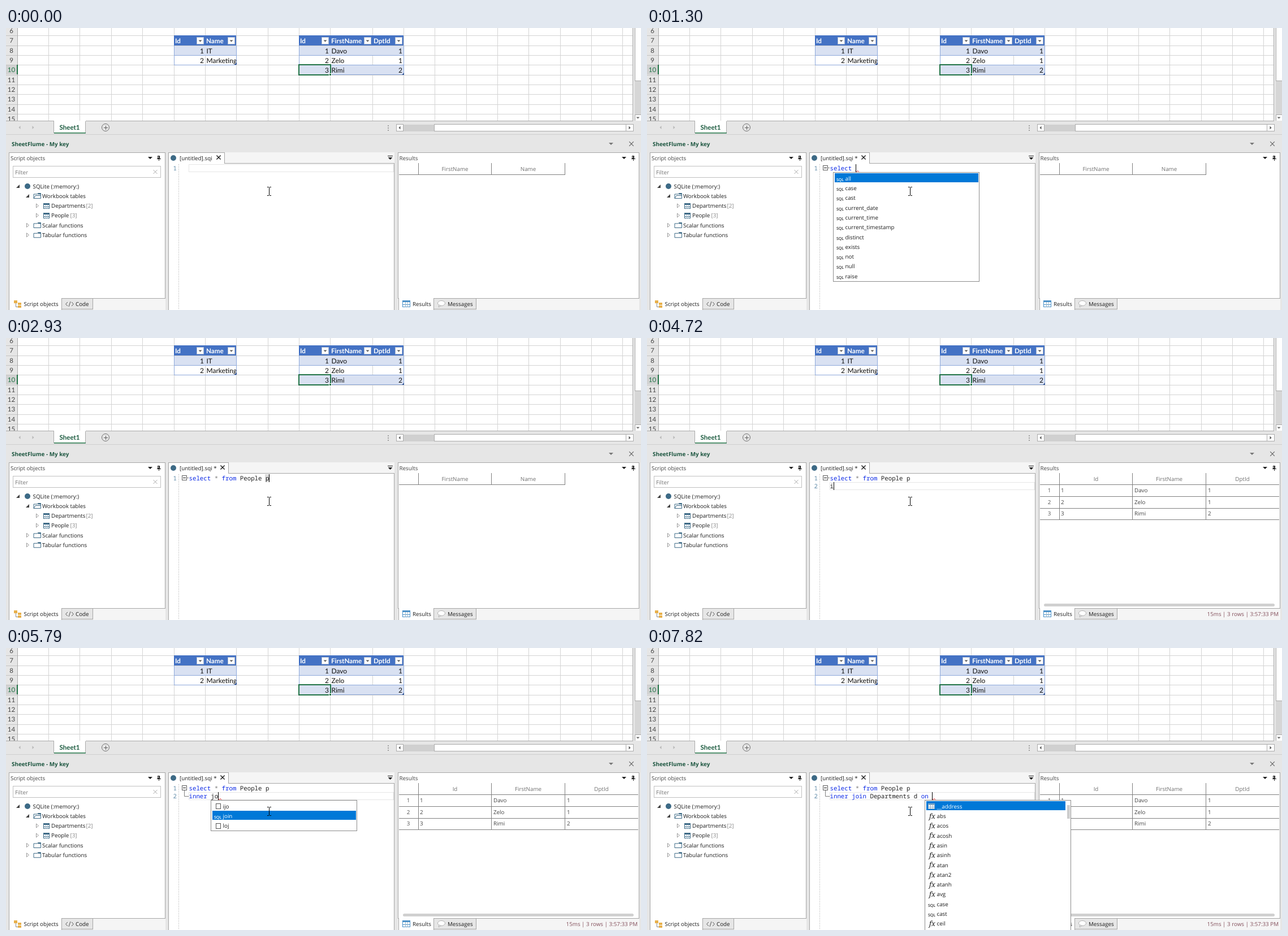
These frames come from a looping animation (1123x499 px, 7990 ms). An HTML page with a canvas:

```html
<!DOCTYPE html>
<html lang="en">
<head>
<meta charset="utf-8">
<title>SQL editor</title>
<style>
html, body { margin: 0; width: 100%; height: 100%; overflow: hidden; background: #e6e6e6; }
canvas { display: block; }
</style>
</head>
<body>
<canvas id="stage" width="1123" height="499"></canvas>
<script>
const g = document.getElementById('stage').getContext('2d');
g.textRendering = 'geometricPrecision';

const DURATION = 7990;
const UI = '"Open Sans", sans-serif', SHEET = 'Lato, sans-serif', CODE = '"Noto Sans Mono", monospace';
const GREEN = '#217346', DARK = '#1e1e1e', GRAY = '#e6e6e6', STRIP = '#f5f5f5', BORDER = '#a6a6a6';
const BLUE = '#0078d7', STEEL = '#3d6a86';
const CODE_X = 323.5, CHAR = 6.45, LINE_Y = [248, 262], ITEM = 17.33;

// Helpers
function box(x, y, w, h, fill, stroke) {
  if (fill) { g.fillStyle = fill; g.fillRect(x, y, w, h); }
  if (stroke) { g.strokeStyle = stroke; g.lineWidth = 1; g.strokeRect(x + .5, y + .5, w - 1, h - 1); }
}
const hline = (x1, x2, y, color) => box(x1, y, x2 - x1, 1, color);
const vline = (x, y1, y2, color) => box(x, y1, 1, y2 - y1, color);

// y is the middle of the capital letters; baselines snap to whole pixels
function text(str, x, y, { color = DARK, size = 9.8, font = UI, weight = 400, align = 'left', style = '' } = {}) {
  g.font = `${style} ${weight} ${size}px ${font}`;
  g.fillStyle = color;
  g.textAlign = align;
  g.fillText(str, x, Math.round(y + size * .36));
}
function path(points, { fill, stroke, width = 1, close = false }) {
  g.beginPath();
  points.forEach(([x, y]) => g.lineTo(x, y));
  if (close || fill) g.closePath();
  if (fill) { g.fillStyle = fill; g.fill(); }
  if (stroke) { g.strokeStyle = stroke; g.lineWidth = width; g.stroke(); }
}
function disc(x, y, r, fill, stroke) {
  g.beginPath();
  g.arc(x, y, r, 0, 7);
  if (fill) { g.fillStyle = fill; g.fill(); }
  if (stroke) { g.strokeStyle = stroke; g.lineWidth = 1; g.stroke(); }
}
const down = (x, y, r, fill) => path([[x - r, y - r / 2], [x + r, y - r / 2], [x, y + r / 2]], { fill });
const side = (x, y, r, fill) => path([[x - r / 2, y - Math.abs(r)], [x + r / 2, y], [x - r / 2, y + Math.abs(r)]], { fill });
function cross(x, y, r, stroke, width = 1.2) {
  path([[x - r, y - r], [x + r, y + r]], { stroke, width });
  path([[x - r, y + r], [x + r, y - r]], { stroke, width });
}
function pin(x, y) {
  box(x - 2, y - 4, 4, 5, null, DARK);
  vline(x, y - 4, y + 1, DARK);
  hline(x - 3, x + 4, y + 1, DARK);
  vline(x, y + 1, y + 5, DARK);
}
function tableIcon(x, y, w = 11, h = 10, color = STEEL) {
  const top = y - h / 2;
  box(x, top, w, h, '#fff', color);
  box(x, top, w, 3, color);
  hline(x, x + w, y + 1, color);
  for (let i = 1; i < 3; i++) vline(x + Math.round(i * w / 3), top + 3, top + h, '#9db8ca');
}
function folderIcon(x, y, open) {
  path([[x, y - 3], [x + 6.5, y - 3], [x + 7.5, y - 4.5], [x + 12.5, y - 4.5], [x + 12.5, y + 4.5], [x, y + 4.5]],
    { fill: '#fff', stroke: STEEL, close: true });
  box(x + 7.5, y - 4.5, 5, 2, STEEL);
  if (open) path([[x, y + 4.5], [x + 3, y - .5], [x + 13, y - .5]], { stroke: STEEL });
}

// Spreadsheet
const columns = [20, 75, 130, 186, 241, 297, 352, 407, 463, 518, 573, 648, 703, 758, 814, 869, 924, 980, 1035, 1090];
const rowTop = row => Math.round(13.4 + (row - 7) * 17.33);

function sheetTable(cols, headers, rows) {
  const left = cols[0], right = cols[cols.length - 1];
  box(left, rowTop(7), right - left, 18, '#4472c4');
  headers.forEach((name, i) => {
    const edge = cols[i + 1];
    text(name, cols[i] + 2, 22.5, { color: '#fff', size: 11.7, font: SHEET, weight: 700 });
    box(edge - 15, 16, 13, 13, '#fff', '#a9b7cf');
    down(edge - 8.5, 23, 3, '#555');
  });
  rows.forEach((cells, r) => {
    const top = rowTop(8 + r);
    if (r % 2 === 0) box(left, top + 1, right - left, 17, '#d9e1f2');
    hline(left, right, top + 17, '#8ea9db');
    cells.forEach((cell, i) => {
      const number = typeof cell === 'number';
      text(cell, number ? cols[i + 1] - 2 : cols[i] + 2.5, top + 9.5,
        { color: '#111', size: 12, font: SHEET, align: number ? 'right' : 'left' });
    });
  });
  const bottom = rowTop(8 + rows.length);
  vline(left, 31, bottom, '#8ea9db');
  vline(right, 31, bottom, '#8ea9db');
  path([[right + 1, bottom - 4], [right + 1, bottom], [right - 3, bottom]], { fill: '#305496' });
}

const people = [[1, 'Davo', 1], [2, 'Zelo', 1], [3, 'Rimi', 2]];

function drawSheet() {
  box(0, 0, 1123, 499, GRAY);
  box(20, 0, 1091, 164, '#fff');
  columns.forEach(x => vline(x, 0, 164, '#d4d4d4'));
  box(0, rowTop(10), 20, 17, '#d2d2d2');
  for (let row = 6; row <= 15; row++) {
    if (row > 6) {
      hline(0, 20, rowTop(row), '#c4c4c4');
      hline(20, 1108, rowTop(row), '#d4d4d4');
    }
    const y = row === 6 ? 5 : rowTop(row) + 9;
    text(row, 9.5, y, { color: row === 10 ? GREEN : '#444', size: 11.5, font: SHEET, align: 'center' });
  }
  vline(20, 0, 164, '#ababab');
  box(19, rowTop(10), 2, 17, GREEN);
  sheetTable([297, 352, 407], ['Id', 'Name'], [[1, 'IT'], [2, 'Marketing']]);
  sheetTable([518, 573, 648, 703], ['Id', 'FirstName', 'DptId'], people);
  g.strokeStyle = GREEN; g.lineWidth = 2;
  g.strokeRect(518, 65, 56, 18);
  box(571, 80, 5, 5, GREEN, '#fff');

  box(1108, 0, 15, 164, GRAY);
  vline(1108, 0, 164, '#ababab');
  box(1112, -2, 12, 96, '#fff', '#ababab');
  box(1112, 94, 11, 59, '#d6d6d6');
  box(1112, 153, 12, 12, '#fff', '#ababab');
  down(1117.5, 159, 3, '#666');

  box(0, 164, 1123, 25, GRAY);
  hline(0, 1109, 164, '#ababab');
  side(24, 176, -3, '#b8b8b8');
  side(48, 176, 3, '#b8b8b8');
  box(85, 164, 56, 22, '#fff');
  vline(84, 165, 186, '#ababab');
  vline(140, 165, 186, '#ababab');
  box(85, 185, 56, 1.5, GREEN);
  text('Sheet1', 112.5, 176, { color: '#1d5c40', size: 11.5, font: SHEET, weight: 700, align: 'center' });
  disc(176, 176, 6.5, null, '#707070');
  hline(173, 180, 176, '#606060');
  vline(176, 173, 180, '#606060');
  for (let i = 0; i < 3; i++) box(675, 172 + i * 4, 2, 2, '#a0a0a0');
  box(702, 171, 56, 12, '#d0d0d0');
  box(690, 170, 13, 13, '#fff', '#ababab');
  side(696, 176.5, -3, '#555');
  box(757, 170, 340, 13, '#fff', '#ababab');
  box(1096, 170, 14, 13, '#fff', '#ababab');
  side(1103, 176.5, 3, '#555');
  hline(0, 1123, 188, '#cfcfcf');
}

// Tool window
function bottomTab(x, w, label, labelX, active) {
  box(x, 478, w, active ? 21 : 20, active ? '#fff' : GRAY, active ? null : BORDER);
  if (active) [x, x + w].forEach(edge => vline(edge, 478, 499, BORDER));
  text(label, labelX, 488.5);
}

function drawPanes() {
  text('SheetFlume - My key', 10, 205, { color: '#1d5640', size: 9.9, weight: 700 });
  down(1070, 205, 4, '#777');
  cross(1106, 205, 3.8, '#666');

  box(5, 479, 277, 20, STRIP);
  box(5, 220, 277, 259, '#fff', BORDER);
  text('Script objects', 8, 230, { color: '#444' });
  down(255, 230, 4, DARK);
  pin(270, 230);
  box(12, 244, 262, 21, '#fff', '#c0c0c0');
  text('Filter', 16, 255, { color: '#777' });
  cross(264, 254.5, 3.5, '#aaa', 1);

  const expanded = (x, y) => path([[x + 3, y - 3], [x + 3, y + 3], [x - 3, y + 3]], { fill: '#404040' });
  const collapsed = (x, y) => path([[x - 2, y - 3.5], [x + 2, y], [x - 2, y + 3.5]], { stroke: '#999', close: true });
  expanded(21, 280);
  disc(38, 280, 5, STEEL);
  text('SQLite (:memory:)', 47.5, 280);
  expanded(38, 297);
  folderIcon(49, 297, true);
  text('Workbook tables', 64, 297);
  [['Departments', 2, 141.5], ['People', 3, 113.5]].forEach(([name, count, x], i) => {
    const y = 314.5 + i * 17;
    collapsed(55.5, y);
    tableIcon(66, Math.round(y), 11);
    text(name, 80, y);
    text(`[${count}]`, x, y, { color: '#888' });
  });
  ['Scalar functions', 'Tabular functions'].forEach((name, i) => {
    const y = 349 + i * 17.3;
    collapsed(38.5, y);
    folderIcon(49, y, false);
    text(name, 64, y);
  });

  bottomTab(5, 93, 'Script objects', 31.5, true);
  bottomTab(98, 56, 'Code', 123, false);
  box(14, 482, 6, 5, '#e8b04a');
  box(21, 486, 6, 4, '#e8b04a');
  box(21, 491, 6, 4, '#e8b04a');
  path([[17.5, 487], [17.5, 493.5], [21, 493.5]], { stroke: '#888' });
  path([[109, 485], [105.5, 488.5], [109, 492]], { stroke: '#555' });
  path([[114, 484], [111, 493]], { stroke: '#555' });
  path([[116, 485], [119.5, 488.5], [116, 492]], { stroke: '#555' });
}

function drawResults(done) {
  const line = '#808080';
  box(693, 479, 427, 20, STRIP);
  box(693, 220, 427, 259, '#fff', BORDER);
  text('Results', 695.5, 230, { color: '#444' });
  down(1093, 230, 4, DARK);
  pin(1109, 230);
  const headers = done ? ['Id', 'FirstName', 'DptId'] : ['FirstName', 'Name'];
  const right = done ? 1118 : 989, bottom = done ? 321 : 259;
  headers.forEach((name, i) => text(name, 794 + i * 129.5, 249, { color: '#707070', align: 'center' }));
  [729, 858, 988].forEach(x => vline(x, 239, bottom, line));
  hline(695, right, 259, line);
  if (done) {
    people.forEach((cells, r) => {
      const y = 269.5 + r * 20.7;
      hline(695, right, Math.round(280 + r * 20.6), line);
      text(r + 1, 711.5, y, { color: '#555', align: 'center' });
      cells.forEach((cell, i) => text(cell, [732, 862, 992][i], y, { color: '#444' }));
    });
    g.fillStyle = '#d0d0d0';
    g.beginPath();
    g.roundRect(702, 470, 408, 5, 2.5);
    g.fill();
    text('15ms | 3 rows | 3:57:33 PM', 1117, 488.5, { color: '#84505c', align: 'right' });
  }
  bottomTab(694, 62, 'Results', 719, true);
  bottomTab(756, 76, 'Messages', 781, false);
  tableIcon(701, 488, 14, 12, '#4a90c8');
  g.beginPath();
  g.ellipse(770, 487, 6.5, 4.5, 0, 0, 7);
  g.fillStyle = '#fff'; g.fill();
  g.strokeStyle = '#b0b0b0'; g.lineWidth = 1; g.stroke();
  path([[766, 490], [765, 494], [769, 491.5]], { fill: '#fff', stroke: '#b0b0b0' });
}

// Completion lists: anchor column, "kind:label" items, selected index
const list = (column, items, selected = 0) => ({ column, items: items.map(s => s.split(':')), selected });
const sql = names => names.split(' ').map(n => 's:' + n);
const fx = names => names.split(' ').map(n => 'f:' + n);
const tables = ['t:Departments', 't:People', 'f:json_each', 'f:json_tree', 'f:pragma_info', 's:select', 's:values'];
const startList = list(1, sql('select savepoint'));
const selectList = list(1, sql('select'));
const exprList = list(1, sql('all case cast current_date current_time current_timestamp distinct exists not null raise'));
const fromList = list(14, tables), peopleList = list(14, ['t:People']);
const innerList = list(1, ['n:ij', 's:inner']);
const joinList = list(6, ['n:ijo', 's:join', 'n:loj'], 1);
const joinTables = list(6, tables), departmentList = list(6, ['t:Departments']);
const onList = list(26, sql('on or'));
const onExprList = list(26, ['t:__address', ...fx('abs acos acosh asin asinh atan atan2 atanh avg'),
  ...sql('case cast'), ...fx('ceil ceiling')]);

const first = 'select * from People p', second = first + '\n';
const steps = [
  [0, ''],
  [530, 's'], [610, 's', startList], [680, 'se', selectList], [760, 'sel', selectList], [840, 'sele', selectList],
  [990, 'selec', selectList], [1070, 'select', selectList], [1220, 'select ', selectList],
  [1300, 'select ', exprList], [1380, 'select '],
  [1610, 'select *'], [1690, 'select * '], [1760, 'select * f'], [1840, 'select * fr'],
  [1910, 'select * fro'], [1990, 'select * from'],
  [2160, 'select * from '], [2230, 'select * from ', fromList], [2310, 'select * from p', fromList],
  [2390, 'select * from p', peopleList], [2460, 'select * from pe', peopleList],
  [2780, 'select * from People'], [2860, 'select * from People '], [2930, first],
  [4030, second], [4720, second + 'i'], [4800, second + 'i', innerList], [4870, second + 'in', innerList],
  [5020, second + 'inn', innerList], [5180, second + 'inne', innerList], [5330, second + 'inner', innerList],
  [5480, second + 'inner '], [5640, second + 'inner j', joinList], [5790, second + 'inner jo', joinList],
  [5860, second + 'inner joi', joinList], [5940, second + 'inner join', joinList], [6090, second + 'inner join '],
  [6170, second + 'inner join ', joinTables], [6490, second + 'inner join d', joinTables],
  [6560, second + 'inner join d', departmentList], [6640, second + 'inner join de', departmentList],
  [6810, second + 'inner join Departments'], [6880, second + 'inner join Departments d '],
  [7350, second + 'inner join Departments d o'], [7520, second + 'inner join Departments d o', onList],
  [7600, second + 'inner join Departments d on', onList], [7750, second + 'inner join Departments d on '],
  [7820, second + 'inner join Departments d on ', onExprList],
];

const within = (t, from, to) => t >= from && t < to;
const keyword = /^(select|from|inner|join|on)$/;

function drawEditor(t, source, popup) {
  const lines = source.split('\n'), last = lines.length - 1, dirty = t >= 530;
  const tabEnd = dirty ? 394 : 387;
  box(287, 220, 400, 20, STRIP);
  box(287, 239, 400, 260, '#fff');
  hline(287, 687, 239, BORDER);
  vline(287, 220, 499, BORDER);
  vline(686, 239, 499, BORDER);
  box(287, 220, tabEnd - 287, 20, '#fff');
  vline(287, 220, 240, BORDER);
  hline(287, tabEnd, 220, BORDER);
  vline(tabEnd - 1, 220, 240, BORDER);
  disc(296, 230, 5, STEEL);
  text('[untitled].sqi' + (dirty ? ' *' : ''), 307, 230);
  cross(dirty ? 383 : 376, 229, 3.6, DARK, 1.4);
  hline(675, 684, 226, DARK);
  down(679.5, 231, 4, DARK);
  for (let y = 241; y < 499; y += 3) box(305, y, 1, 1, '#a0a0a0');

  if (!dirty || last) box(323, dirty ? 255 : 241, 363, 14, null, GRAY);
  if (within(t, 2930, 4260)) box(458, 241, 7, 14, '#dcdcdc');
  lines.forEach((line, i) => {
    text(i + 1, 302, LINE_Y[i], { color: '#5f8aa8', size: 10.75, font: CODE, align: 'right' });
    for (const { 0: word, index } of line.matchAll(/\S+/g)) {
      const color = keyword.test(word) ? '#0a28e6' : word === '*' ? '#808080' : DARK;
      text(word, CODE_X + index * CHAR, LINE_Y[i], { color, size: 10.75, font: CODE });
    }
  });
  if (dirty) {
    if (t >= 5100) path([[315.5, 252], [315.5, 262.5], [323, 262.5]], { stroke: '#808080' });
    else hline(320, 323, 247, '#808080');
    box(311, 243, 9, 9, '#fff', '#606060');
    hline(313, 318, 247, DARK);
  }

  const column = lines[last].length, caretX = CODE_X + column * CHAR;
  if (popup) {
    const partial = (lines[last].match(/\bde?$/) || [''])[0].length;
    const from = caretX - partial * CHAR, to = partial ? caretX : caretX + 6, points = [];
    for (let x = from, i = 0; x <= to; x += 2, i++) points.push([x, LINE_Y[last] + (i % 2 ? 6.5 : 4.5)]);
    path(points, { stroke: '#f02020' });
  }
  if (dirty && !within(t, 3480, 3800) && !within(t, 4490, 4720))
    vline(Math.round(caretX), LINE_Y[last] - 7, LINE_Y[last] + 7, '#000');
}

function itemIcon(kind, x, y, selected) {
  const color = selected ? '#fff' : '#333';
  if (kind === 's') text('SQL', x, y + 2, { color, size: 7, weight: 600 });
  if (kind === 'f') text('fx', x + 2, y, { size: 12.5, font: '"Noto Serif", serif', style: 'italic' });
  if (kind === 't') tableIcon(x, Math.round(y), 12, 10, selected ? '#7fa6c4' : STEEL);
  if (kind === 'n') box(x + 3, Math.round(y) - 5, 9, 10, '#fff', '#555');
}

function drawPopup({ column, items, selected }, top) {
  const x = Math.round(CODE_X + column * CHAR - .7), long = items.length > 11;
  box(x, top, 259, Math.round(items.length * ITEM + 3), '#fff', '#8c8c8c');
  items.forEach(([kind, name], i) => {
    const y = top + 11 + i * ITEM, active = i === selected;
    if (active) box(x + 3, Math.round(y - 9), long ? 246 : 254, 16, BLUE);
    itemIcon(kind, x + 6, y, active);
    text(name, x + 21.5, y, { color: active ? '#fff' : DARK });
  });
  if (long) box(x + 252, top + 9, 5, 24, '#cdcdcd');
}

function drawPointer() {
  path([[462, 281.5], [464.5, 281.5], [465.5, 282.5], [466.5, 281.5], [469, 281.5]], { stroke: '#000' });
  path([[462, 296.5], [464.5, 296.5], [465.5, 295.5], [466.5, 296.5], [469, 296.5]], { stroke: '#000' });
  vline(465, 282, 296, '#000');
}

function draw() {
  const t = performance.now() % DURATION;
  const [, source, popup] = steps.findLast(([start]) => start <= t);
  drawSheet();
  drawPanes();
  drawResults(t >= 3250);
  drawEditor(t, source, popup);
  if (popup) drawPopup(popup, source.includes('\n') ? 269 : 255);
  drawPointer();
  requestAnimationFrame(draw);
}
draw();
</script>
</body>
</html>
```
